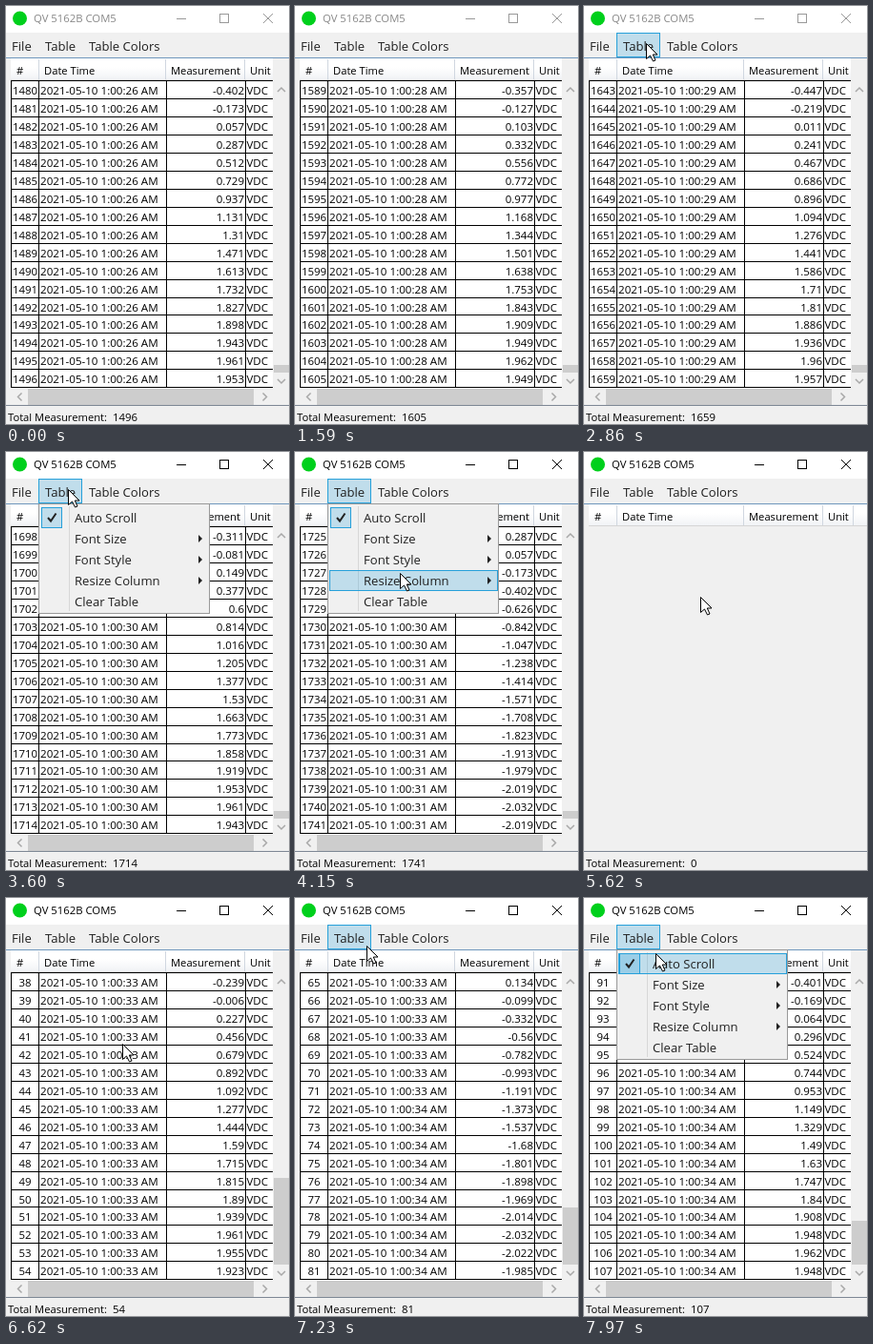
An HTML page with a canvas for the animation above (8000 ms loop, 297 by 439 pixels).

```html
<!DOCTYPE html>
<html lang="en">
<head>
<meta charset="utf-8">
<title>Measurement table</title>
<style>
html, body { margin: 0; width: 100%; height: 100%; overflow: hidden; background: #f0f0f0; }
canvas { display: block; width: 297px; height: 439px; }
</style>
</head>
<body>
<canvas id="stage" width="297" height="439"></canvas>
<script>
const ctx = document.getElementById('stage').getContext('2d');
const LOOP = 8000, ROWS = 17, ROW_H = 18.96, TOP = 78;
const FACE = '#f0f0f0', BLUE = '#26a0da', TINT = 'rgba(38,160,218,0.24)';
const INK = '#212121', PALE = '#a8a8a8', THUMB = '#cdcdcd';

// New rows arrive in batches of half a signal period, two batches a second.
const FIRST_BATCH = 70, BATCH_MS = 502, CLEAR_BATCH = 12;
const beforeClear = { start: 1496, batch: 27.2, peak: 1495.2, second: 26, secondRow: 1460 };
const afterClear = { start: 0, batch: 26.85, peak: 106, second: 33, secondRow: 18 };

const opened = 3390, closed = 5550, reopened = 7700;
const subOpened = 4410, subClosed = 4960;

// [time, x, y] of the pointer tip
const pointerPath = [
  [2510, 76, 3], [2860, 65, 39], [3860, 65, 39], [4220, 115, 136], [4490, 115, 136],
  [4700, 122, 152], [6880, 122, 153], [7230, 75, 50], [7770, 75, 50], [7970, 75, 58]
];

const menuItems = ['Auto Scroll', 'Font Size', 'Font Style', 'Resize Column', 'Clear Table'];

const clamp = (v, lo = 0, hi = 1) => Math.max(lo, Math.min(hi, v));
const rowY = i => Math.round(TOP + i * ROW_H);

function fill(x, y, w, h, color) {
  ctx.fillStyle = color;
  ctx.fillRect(x, y, w, h);
}

function frame(x, y, w, h, color) {
  ctx.strokeStyle = color;
  ctx.lineWidth = 1;
  ctx.strokeRect(x + 0.5, y + 0.5, w - 1, h - 1);
}

function highlight(x, y, w, h) {
  fill(x, y, w, h, TINT);
  frame(x, y, w, h, BLUE);
}

function text(str, x, y, size = 11.2, color = '#000', align = 'left') {
  ctx.font = `${size}px "Open Sans", "Noto Sans", sans-serif`;
  ctx.textAlign = align;
  ctx.fillStyle = color;
  ctx.fillText(str, x, y);
}

const menuText = (str, x, y) => text(str, x, y, 13.1, INK);

function polyline(points, color, width) {
  ctx.beginPath();
  points.forEach(([x, y]) => ctx.lineTo(x, y));
  ctx.strokeStyle = color;
  ctx.lineWidth = width;
  ctx.stroke();
}

function chevron(x, y, angle) {
  ctx.save();
  ctx.translate(x, y);
  ctx.rotate(angle);
  polyline([[-4, 2], [0, -2], [4, 2]], PALE, 1.5);
  ctx.restore();
}

function runAt(t) {
  const ticks = Math.floor((t - FIRST_BATCH) / BATCH_MS) + 1;
  const run = ticks < CLEAR_BATCH ? beforeClear : afterClear;
  const done = ticks < CLEAR_BATCH ? ticks : ticks - CLEAR_BATCH;
  return { ...run, count: run.start + Math.round(run.batch * done) };
}

const reading = (n, run) =>
  +(-0.035 + 1.997 * Math.cos(Math.PI * (n - run.peak) / run.batch)).toFixed(3);

function stamp(n, run) {
  const second = run.second + Math.floor((n - run.secondRow) / (2 * run.batch));
  return `2021-05-10 1:00:${second} AM`;
}

function pointerAt(t) {
  if (t < pointerPath[0][0]) return null;
  const next = pointerPath.findIndex(p => p[0] > t);
  if (next < 0) return pointerPath[pointerPath.length - 1].slice(1);
  const [t0, x0, y0] = pointerPath[next - 1], [t1, x1, y1] = pointerPath[next];
  const k = (t - t0) / (t1 - t0), e = k * k * (3 - 2 * k);
  return [Math.round(x0 + (x1 - x0) * e), Math.round(y0 + (y1 - y0) * e)];
}

function drawTitle(active) {
  const ink = active ? '#000' : '#999';
  fill(0, 0, 297, 28, '#fff');
  ctx.beginPath();
  ctx.arc(14.5, 13, 7.5, 0, 7);
  ctx.fillStyle = '#00d01c';
  ctx.fill();
  text('QV 5162B COM5', 29, 17, 11.3, active ? '#000' : '#888');
  fill(179, 13, 10, 1, ink);
  frame(224, 8, 10, 10, ink);
  polyline([[270, 8], [280, 18]], ink, 1);
  polyline([[280, 8], [270, 18]], ink, 1);
}

function drawMenuBar(tableLit) {
  fill(0, 28, 297, 26, FACE);
  if (tableLit) highlight(34, 28, 46, 26);
  menuText('File', 6, 47);
  menuText('Table', 41, 47);
  menuText('Table Colors', 87, 47);
}

function drawHeader() {
  const shade = ctx.createLinearGradient(0, 55, 0, 78);
  shade.addColorStop(0.4, '#fff');
  shade.addColorStop(1, '#f0f2f5');
  fill(5, 55, 292, 23, shade);
  fill(0, 54, 297, 1, '#6f97bd');
  fill(5, 77, 292, 1, '#d5d5d5');
  [34, 167, 250, 282].forEach(x => fill(x, 56, 1, 21, '#d0d7e0'));
  text('#', 11, 72);
  text('Date Time', 40, 72);
  text('Measurement', 173, 72);
  text('Unit', 256, 72);
}

function drawScrollBars(count) {
  const thumb = Math.max(8, Math.round(288 * ROWS / count));
  fill(280, 55, 17, 364, FACE);
  fill(5, 402, 292, 17, FACE);
  fill(281, 385 - thumb, 16, thumb, THUMB);
  fill(23, 402, 237, 17, THUMB);
  chevron(289, 88, 0);
  chevron(289, 394, Math.PI);
  chevron(14.5, 410.5, -Math.PI / 2);
  chevron(271.5, 410.5, Math.PI / 2);
}

function drawTable(run) {
  fill(5, TOP, 275, 324, '#fff');
  for (let i = 0; i < ROWS; i++) {
    const n = run.count - ROWS + 1 + i, y = rowY(i) + 15;
    text(n, 20, y, 11.4, '#000', 'center');
    text(stamp(n, run), 36, y, 11.6);
    text(reading(n, run), 250, y, 11.5, '#000', 'right');
    text('VDC', 252.5, y, 11.5);
  }
  for (let i = 0; i <= ROWS; i++) fill(5, rowY(i), 275, 1, '#000');
  [5, 34, 168, 251].forEach(x => fill(x, TOP, 1, rowY(ROWS) - TOP, '#000'));
  drawScrollBars(run.count);
}

function drawCheck(x, y) {
  highlight(x, y, 22, 22);
  polyline([[x + 7, y + 11], [x + 10, y + 14.5], [x + 15.5, y + 6.5]], INK, 2);
}

function drawPopup(x, y, w, h) {
  fill(x, y, w, h, FACE);
  frame(x, y, w, h, '#999');
  fill(x + 32, y + 3, 1, h - 6, '#d7d7d7');
}

function drawMenu(hovered) {
  drawPopup(34, 54, 180, 116);
  if (hovered >= 0) highlight(36, 58 + hovered * 22, 177, 22);
  drawCheck(37, 58);
  menuItems.forEach((label, i) => {
    const y = 69 + i * 22;
    menuText(label, 72, y + 5);
    if (i > 0 && i < 4) {
      ctx.beginPath();
      ctx.moveTo(202, y - 4);
      ctx.lineTo(206, y);
      ctx.lineTo(202, y + 4);
      ctx.fill();
    }
  });
}

function drawSubmenu() {
  drawPopup(210, 120, 130, 72);
  drawCheck(213, 168);
  ['per Header', 'per Cell', 'Both'].forEach((label, i) => menuText(label, 248, 141 + i * 21.7));
}

function drawPointer([x, y]) {
  const outline = [[0, 0], [0, 16], [4, 12.5], [7, 18.5], [9.5, 17.5], [6.8, 11.5], [11.5, 11.5]];
  ctx.beginPath();
  outline.forEach(([dx, dy]) => ctx.lineTo(x + 0.5 + dx, y + 0.5 + dy));
  ctx.closePath();
  ctx.fillStyle = '#fff';
  ctx.fill();
  ctx.strokeStyle = '#000';
  ctx.lineWidth = 1;
  ctx.stroke();
}

function fadeIn(since, draw) {
  ctx.globalAlpha = clamp((since + 20) / 130);
  draw();
  ctx.globalAlpha = 1;
}

function render(t) {
  const run = runAt(t), pointer = pointerAt(t);
  const [px, py] = pointer || [-1, -1];
  const menuOpen = (t >= opened && t < closed) || t >= reopened;
  const overTable = px >= 34 && px < 80 && py >= 28 && py < 54;
  const hovered = py >= 56 ? clamp(Math.floor((py - 58) / 22), 0, 4) : -1;

  fill(0, 0, 297, 439, FACE);
  drawTitle(t >= opened);
  drawMenuBar(overTable || menuOpen);
  drawHeader();
  if (run.count) drawTable(run);
  fill(0, 419, 297, 1, '#7d8794');
  text('Total Measurement:', 2, 436);
  text(run.count, 112, 436, 11.4);

  if (menuOpen) fadeIn(t - (t < closed ? opened : reopened), () => drawMenu(hovered));
  if (t >= subOpened && t < subClosed) fadeIn(t - subOpened, drawSubmenu);
  if (pointer) drawPointer(pointer);
}

function tick() {
  render(performance.now() % LOOP);
  requestAnimationFrame(tick);
}
tick();
</script>
</body>
</html>
```
